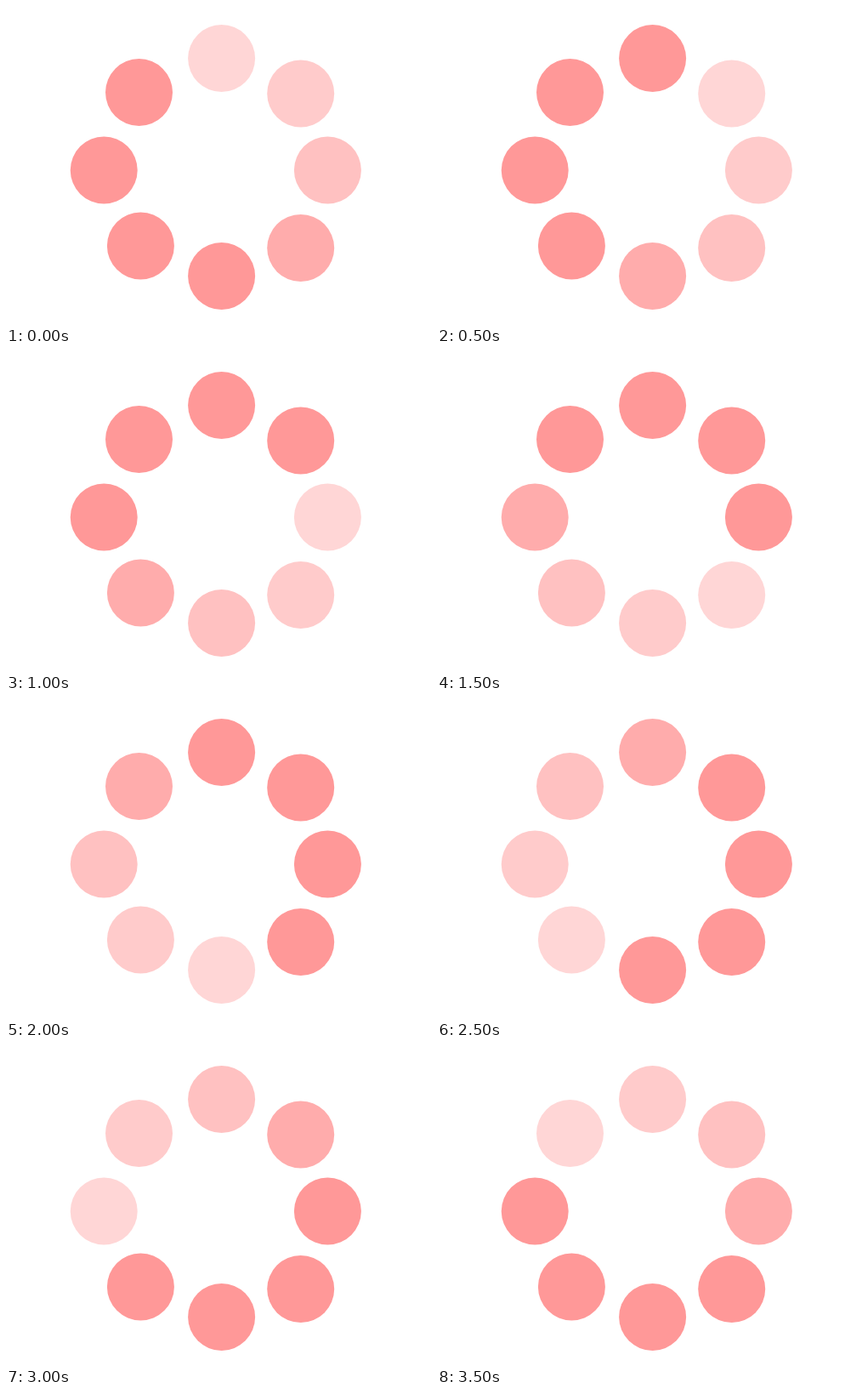
An HTML page for the animation above (4500 ms loop, 500 px wide and 375 px high).

```html
<!DOCTYPE html>
<html lang="en">
<head>
<meta charset="utf-8">
<title>Loading ring</title>
<style>
  html, body { margin: 0; width: 100%; height: 100%; overflow: hidden; background: #fff; }
  svg { display: block; width: 100vw; height: 100vh; fill: #ff9898; }
</style>
</head>
<body>
<svg viewBox="0 0 500 375"></svg>
<script>
const STEP = 500, LOOP = 4500, COUNT = 8, RADIUS = 39.5;
// Dot centres of the uneven ring, clockwise from the top
const centers = [
  [253.6, 61.6], [346.7, 102.9], [378.4, 193], [346.7, 284.5],
  [253.6, 317.4], [158.4, 281.9], [115.2, 193], [156.5, 101.6]
];

const svg = document.querySelector('svg');
const dots = centers.map(([cx, cy]) => {
  const dot = document.createElementNS(svg.namespaceURI, 'circle');
  for (const [name, value] of Object.entries({ cx, cy, r: RADIUS })) dot.setAttribute(name, value);
  return svg.appendChild(dot);
});

// Palest at the head, rising slowly and then faster to full colour
const opacity = lag => Math.min(1, Math.max(0.4 + 0.1 * lag, 0.2 + 0.2 * lag));

function draw(time) {
  // The last step holds for twice as long
  const head = Math.min(Math.floor(time % LOOP / STEP), COUNT - 1);
  dots.forEach((dot, i) => dot.setAttribute('opacity', opacity((i - head + COUNT) % COUNT)));
}

let start;
function tick(now) {
  start ??= now;
  draw(now - start);
  requestAnimationFrame(tick);
}
draw(0);
requestAnimationFrame(tick);
</script>
</body>
</html>
```
